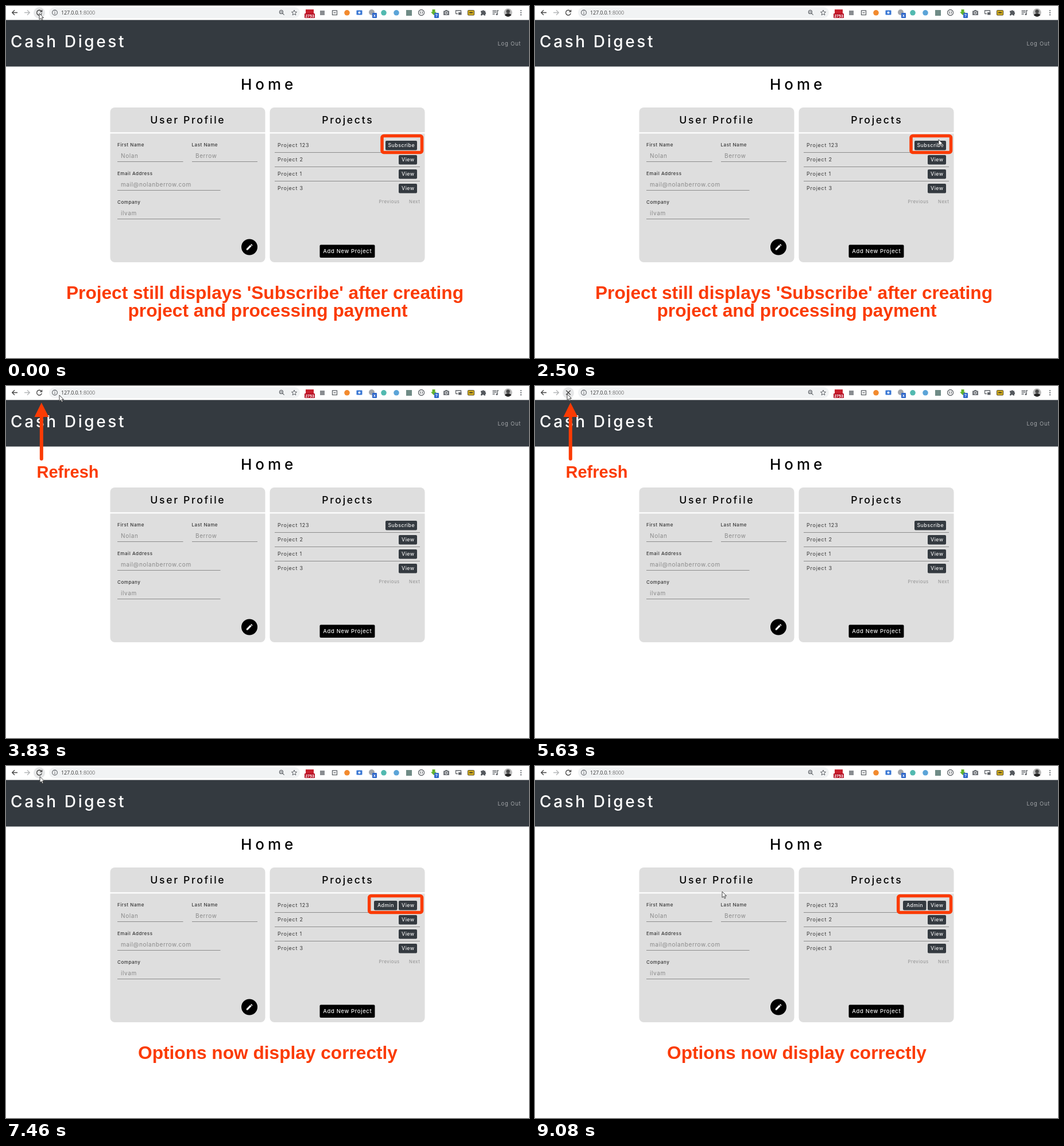
These frames come from a looping animation (911x614 px, 9290 ms). An HTML page:

```html
<!DOCTYPE html>
<html lang="en">
<head>
<meta charset="utf-8">
<title>Project list refresh</title>
<style>
  html, body { margin: 0; width: 100%; height: 100%; overflow: hidden; background: #fff; }
  svg { display: block; width: 911px; height: 614px; }
  text { font-family: Inter, "Open Sans", sans-serif; white-space: pre; }
  .mid { text-anchor: middle; }
  .title { font-size: 17.6px; font-weight: 500; letter-spacing: 2.7px; }
  .label { font-size: 8px; font-weight: 500; letter-spacing: .55px; fill: #333; }
  .value { font-size: 10px; letter-spacing: .6px; fill: #8a8a8a; }
  .row { font-size: 9px; letter-spacing: .75px; fill: #3a3a3a; }
  .btn { font-size: 8.8px; font-weight: 500; letter-spacing: .45px; fill: #eee; }
  .page { font-size: 7.8px; letter-spacing: .55px; fill: #909090; }
  .url { font: 9px "Open Sans", "Noto Sans", sans-serif; letter-spacing: -.15px; }
  .badge { font: bold 7px "Liberation Sans", sans-serif; fill: #fff; }
  .note { font: bold 31.65px "Liberation Sans", Arial, sans-serif; fill: #fb3b04; }
  .rule { stroke: #8c8c8c; stroke-width: 1; }
  .ico { fill: none; stroke: #5f6368; stroke-width: 1.3; }
  .frame { fill: none; stroke: #fb3b04; stroke-width: 5.5; }
</style>
</head>
<body>
<svg viewBox="0 0 911 614">
  <!-- browser bar -->
  <rect x="75" y="2" width="437" height="19" rx="9.5" fill="#f1f3f4"/>
  <g class="ico">
    <path d="M20 11.5H11M15 7.2L10.7 11.5L15 15.8" stroke="#444"/>
    <path d="M32 11.5H41M37 7.2L41.3 11.5L37 15.8" stroke="#b4b6b8"/>
    <circle id="hover" cx="58" cy="12" r="10" fill="#e6e7e8" stroke="none"/>
    <path id="reload" d="M61.6 9.1A4.4 4.4 0 1 0 62.3 12.6M62.6 6.8V10.2H59.2" stroke="#444"/>
    <path id="stop" d="M54.2 7.7L61.8 15.3M61.8 7.7L54.2 15.3"/>
    <circle cx="85" cy="11.5" r="4.4" stroke-width="1.1"/>
    <path d="M85 11V14M85 8.7V9.9" stroke-width="1.1"/>
    <circle cx="479.4" cy="10.4" r="3" stroke-width="1.2"/>
    <path d="M481.6 12.6L484.6 15.6M478 10.4H480.8" stroke-width="1.1"/>
    <path d="M502 7L503.3 10.2L506.6 10.4L504 12.6L504.9 15.9L502 14.1L499.1 15.9L500 12.6L497.4 10.4L500.7 10.2Z" stroke-width="1"/>
  </g>
  <text class="url" x="96" y="15" fill="#333">127.0.0.1<tspan fill="#777">:8000</tspan></text>

  <!-- extension buttons -->
  <rect x="522" y="6" width="14" height="9" fill="#c9202e"/>
  <rect x="520" y="13" width="18" height="8" rx="1" fill="#b50d22"/>
  <text class="badge mid" x="529" y="19.5">2753</text>
  <rect x="547" y="8" width="8" height="8" fill="#8a8d91"/>
  <rect x="568.5" y="8" width="8" height="7.5" class="ico" stroke-width="1"/>
  <path d="M570.5 11.7H574.5" class="ico"/>
  <circle cx="594" cy="11.8" r="4.8" fill="#f28a2e"/>
  <rect x="610.5" y="7.5" width="10" height="8" rx="1" fill="#3977d4"/>
  <circle cx="615.5" cy="11.5" r="2" fill="#fff"/>
  <circle cx="637" cy="11" r="5" fill="#a3a7ac"/>
  <rect x="638" y="12" width="8" height="9" rx="1" fill="#2f67c9"/>
  <text class="badge mid" x="642" y="19">x</text>
  <circle cx="658" cy="11.8" r="4.8" fill="#52b9b0"/>
  <circle cx="680" cy="11.8" r="4.8" fill="#5ba4d8"/>
  <rect x="697" y="7" width="10" height="10" fill="#6f8b86"/>
  <circle cx="723.5" cy="11.5" r="5" class="ico" stroke-width="1.1"/>
  <path d="M722.2 9.4Q720.8 11.5 722.2 13.6M724.8 9.4Q726.2 11.5 724.8 13.6" class="ico" stroke-width="1"/>
  <path d="M742.5 6H747.5V10.5H750L745 16L740 10.5H742.5Z" fill="#63b32e"/>
  <rect x="746" y="12" width="8" height="9" rx="1" fill="#2f67c9"/>
  <text class="badge mid" x="750" y="19">?</text>
  <path d="M762 8.5H764.4L765.4 7H768.6L769.6 8.5H772V16H762Z" fill="#6c7075"/>
  <circle cx="767" cy="12" r="2.2" fill="#6c7075" stroke="#fff"/>
  <path d="M783.5 13.5V8H792.5V11M783.5 13.5H787" class="ico"/>
  <rect x="788" y="11" width="5.5" height="4.5" fill="#5f6368"/>
  <rect x="804.5" y="7.5" width="11" height="8.5" rx="1" fill="#d3ad20" stroke="#4a4322"/>
  <path d="M807 11.5H813" stroke="#4a4322" stroke-width="2"/>
  <path d="M827 8.5H829.5A1.7 1.7 0 0 1 832.8 8.5H835V11A1.7 1.7 0 0 1 835 14.2V16.5H832.5A1.7 1.7 0 0 0 829.3 16.5H827V14A1.6 1.6 0 0 0 827 11Z" fill="#55595e"/>
  <path d="M847.5 8.5H854.5M847.5 11.2H854.5M847.5 14H851.5M856 14.5V8H858" class="ico"/>
  <circle cx="855" cy="14.5" r="1.6" fill="#5f6368"/>
  <clipPath id="round"><circle cx="874.5" cy="11.5" r="7.2"/></clipPath>
  <g clip-path="url(#round)">
    <rect x="867" y="4" width="15" height="15" fill="#b9b9b9"/>
    <circle cx="874.5" cy="9.5" r="3.2" fill="#4a4a4a"/>
    <ellipse cx="874.5" cy="18" rx="6.5" ry="5" fill="#262626"/>
  </g>
  <g fill="#5f6368"><circle cx="897" cy="8" r="1.1"/><circle cx="897" cy="11.7" r="1.1"/><circle cx="897" cy="15.4" r="1.1"/></g>

  <!-- page header -->
  <rect y="24.4" width="911" height="81.2" fill="#343a40"/>
  <text x="8" y="72.3" font-size="28" font-weight="500" letter-spacing="3.6" fill="#fff">Cash Digest</text>
  <text x="856.5" y="68.5" font-size="9.3" letter-spacing=".85" fill="#a3a6a9">Log Out</text>
  <text class="mid" x="457.6" y="146" font-size="26" font-weight="500" letter-spacing="6">Home</text>

  <!-- cards -->
  <g fill="#dedede">
    <rect x="181.5" y="177" width="270" height="270" rx="8"/>
    <rect x="459.5" y="177" width="270" height="270" rx="8"/>
  </g>
  <path d="M181 221.3H452M459 221.3H730" stroke="#fff" stroke-width="2.2"/>
  <text class="title mid" x="316.8" y="205">User Profile</text>
  <text class="title mid" x="595.3" y="205">Projects</text>

  <text class="label" x="194" y="245">First Name</text>
  <text class="label" x="323.5" y="245">Last Name</text>
  <text class="label" x="194" y="295">Email Address</text>
  <text class="label" x="194" y="345">Company</text>
  <text class="value" x="200" y="265">Nolan</text>
  <text class="value" x="330" y="265">Berrow</text>
  <text class="value" x="200" y="315">mail@nolanberrow.com</text>
  <text class="value" x="200" y="365">ilvam</text>
  <path class="rule" d="M194 271.5H308.5M324 271.5H438M194 321.5H373.5M194 371.5H373.5"/>
  <circle cx="424" cy="420.5" r="14"/>
  <path d="M418.8 425.7V423.4L425.4 416.8L427.7 419.1L421.1 425.7ZM426.1 416.1L427.2 415L429.5 417.3L428.4 418.4Z" fill="#fff"/>

  <path class="rule" d="M468 255.5H721M468 280.5H721M468 305.5H721"/>
  <g id="rows"></g>
  <g id="before"></g>
  <g id="after"></g>
  <text class="page" x="649.5" y="344">Previous</text>
  <text class="page" x="702" y="344">Next</text>
  <rect x="546.5" y="416.5" width="96" height="22.5" rx="2"/>
  <text class="mid" x="594.8" y="431.2" font-size="9.5" font-weight="500" letter-spacing=".6" fill="#eee">Add New Project</text>

  <!-- annotations -->
  <g id="problem">
    <rect class="frame" x="655" y="226.5" width="69.5" height="29" rx="3"/>
    <text class="note mid" x="451" y="510.5">Project still displays 'Subscribe' after creating</text>
    <text class="note mid" x="456" y="542.3">project and processing payment</text>
  </g>
  <g id="hint">
    <path d="M61.8 50V127" stroke="#fb3b04" stroke-width="6" stroke-linecap="round"/>
    <path d="M61.8 29L74.5 54H49.5Z" fill="#fb3b04"/>
    <text class="note" x="53.5" y="160" style="font-size:29px">Refresh</text>
  </g>
  <g id="solved">
    <rect class="frame" x="632.7" y="226.5" width="91.8" height="29" rx="3"/>
    <text class="note mid" x="456" y="510.5">Options now display correctly</text>
  </g>

  <path id="cursor" d="M0 0V10.5L2.5 8.3L4.2 12L6 11.2L4.3 7.6H7.5Z" fill="#fff" stroke="#333" stroke-width=".9"/>
</svg>
<script>
const LOOP = 9290, HINT_AT = 3000, CLICK_AT = 4830, LOADED_AT = 6000, IDLE_AT = 7400;
// time, x, y of the pointer tip
const PATH = [
  [0, 58, 13], [1960, 58, 13], [2460, 703, 233], [2960, 703, 233], [3830, 93, 16],
  [4150, 56, 14], [7400, 56, 14], [8000, 162, 167], [8290, 162, 167],
  [8710, 231, 198], [8980, 231, 198], [9080, 326, 219], [LOOP, 326, 219]
];
const $ = id => document.getElementById(id);
const show = (id, on) => $(id).style.display = on ? '' : 'none';

const button = (label, x, y, w) =>
  `<rect x="${x}" y="${y - 8}" width="${w}" height="16.5" rx="2" fill="#343a40"/>
   <text class="btn mid" x="${x + w / 2 + .25}" y="${y + 3.4}">${label}</text>`;

$('rows').innerHTML = ['123', '2', '1', '3'].map((name, i) => {
  const y = 243 + 25 * i;
  return `<text class="row" x="473" y="${y + 3.2}">Project ${name}</text>` +
    (i ? button('View', 684, y, 32) : '');
}).join('');
$('before').innerHTML = button('Subscribe', 661, 243, 55);
$('after').innerHTML = button('Admin', 641, 243, 40.5) + button('View', 684, 243, 32);

function pointer(t) {
  const i = PATH.findIndex(p => p[0] > t);
  const [t0, x0, y0] = PATH[i - 1], [t1, x1, y1] = PATH[i];
  const u = (t - t0) / (t1 - t0), e = u * u * (3 - 2 * u);
  return [x0 + (x1 - x0) * e, y0 + (y1 - y0) * e];
}

function draw() {
  const t = performance.now() % LOOP;
  const [x, y] = pointer(t);
  const loaded = t >= LOADED_AT;
  const stopping = t >= CLICK_AT && t < IDLE_AT;
  const locked = loaded && stopping;
  $('cursor').setAttribute('transform', `translate(${x} ${y})`);
  show('hover', Math.hypot(x - 58, y - 12) < 10 && !locked);
  show('reload', !stopping);
  show('stop', stopping);
  $('stop').style.stroke = locked ? '#c4c6c8' : '#444';
  show('before', !loaded);
  show('after', loaded);
  show('problem', t < HINT_AT);
  show('hint', t >= HINT_AT && !loaded);
  show('solved', loaded);
  requestAnimationFrame(draw);
}
draw();
</script>
</body>
</html>
```
